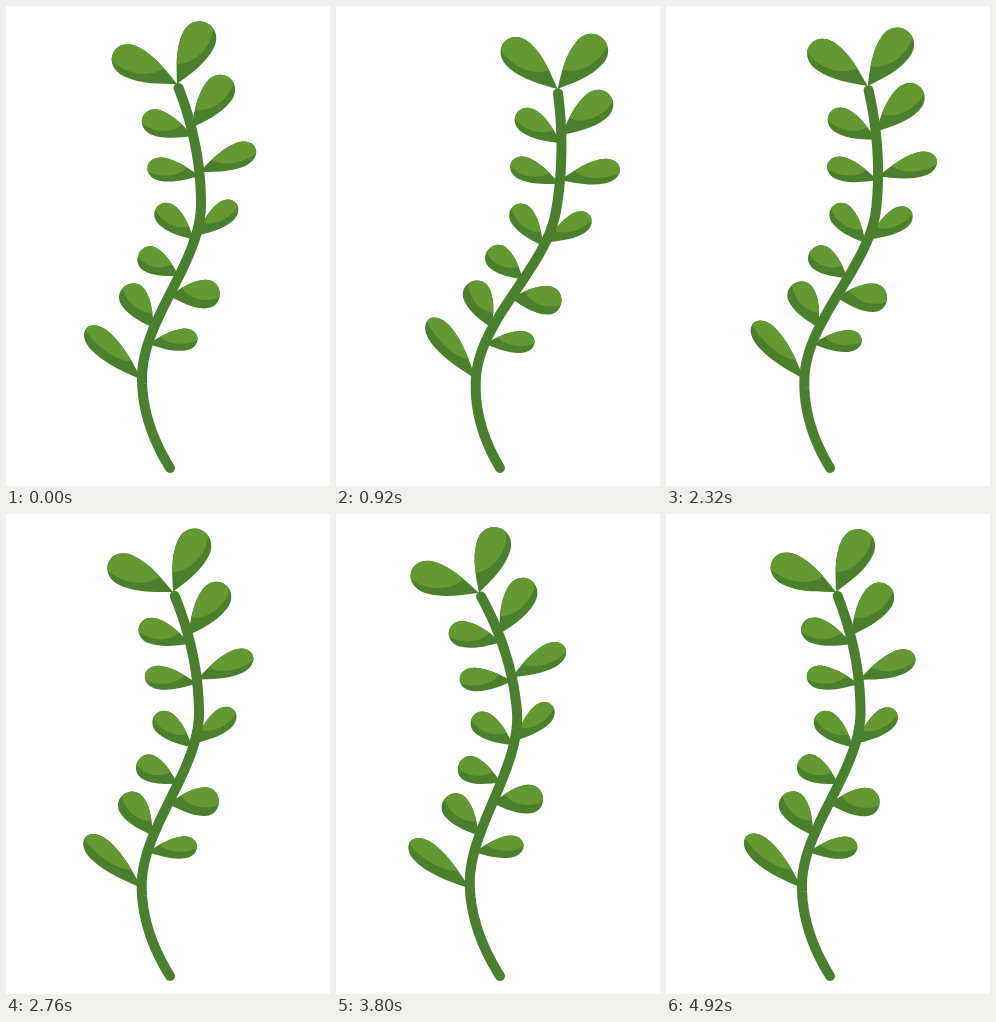
An HTML page with a canvas for the animation above (4960 ms loop, 324 by 480 pixels).

```html
<!DOCTYPE html>
<html lang="en">
<head>
<meta charset="utf-8">
<title>Swaying sprig</title>
<style>
  html, body { margin: 0; height: 100%; overflow: hidden; background: #fff; }
  canvas { display: block; }
</style>
</head>
<body>
<canvas width="324" height="480"></canvas>
<script>
const ctx = document.querySelector('canvas').getContext('2d');
const LOOP = 4960, STEP = 40, RAD = Math.PI / 180;
const DARK = '#4a802d', LIGHT = '#639833';
const ROOT_Y = 462, TOP_Y = 78, PARTS = 96;

// Height on the stem, angle from upright, length, half width.
const leaves = [
  [373, -47, 76, 12.7],
  [339, 83, 50, 11],
  [324, -34, 51, 14],
  [290, 87, 51, 14.3],
  [269, -60, 46, 13],
  [233, -48, 50, 12.3],
  [229, 51, 52, 11.5],
  [170, -80, 53, 11.7],
  [168, 67, 61, 12.3],
  [129, -70, 54, 13],
  [123, 37, 63, 15.5],
  [79, -64, 71, 16.3],
  [78, 26, 68, 17.3]
];

// Straight run out to the right, across to the left, and home.
function swayAt(time) {
  const right = 1595, left = 3240, far = 1.03, near = -0.49;
  if (time < right) return far * time / right;
  if (time < left) return far + (near - far) * (time - right) / (left - right);
  return near * (LOOP - time) / (LOOP - left);
}

// Resting stem: a hook at the root, an S in the middle, a hook at the top.
function restX(y) {
  if (y > 372) return 136 + 28 * ((y - 372) / 90) ** 2;
  if (y < 198) return 195 - 24 * ((198 - y) / 120) ** 2;
  const t = (372 - y) / 174;
  return 136 + 59 * t * t * (3 - 2 * t);
}

// Each piece of stem turns further the higher it sits.
function bendStem(sway) {
  const dy = (TOP_Y - ROOT_Y) / PARTS;
  let x = restX(ROOT_Y), y = ROOT_Y;
  const points = [[x, y]];
  for (let i = 0; i < PARTS; i++) {
    const rest = ROOT_Y + i * dy, dx = restX(rest + dy) - restX(rest);
    const bend = sway * (1.7 + 22 * (i + 0.5) / PARTS) * RAD;
    x += dx * Math.cos(bend) - dy * Math.sin(bend);
    y += dx * Math.sin(bend) + dy * Math.cos(bend);
    points.push([x, y]);
  }
  return points;
}

function drawLeaf([y, angle, length, half], points, sway) {
  const u = (ROOT_Y - y) / (ROOT_Y - TOP_Y);
  const side = Math.sign(angle);
  const turn = side > 0 ? 28 * u - 2 : 15 * u + 11;
  const shade = 0.35 * (1 - u);
  ctx.save();
  ctx.translate(...points[Math.round(u * PARTS)]);
  ctx.rotate((angle + turn * sway) * RAD);
  ctx.scale(side * half, -length);

  ctx.beginPath();
  ctx.moveTo(0, 0);
  ctx.bezierCurveTo(0.4, 0.2, 1, 0.45, 1, 0.72);
  ctx.bezierCurveTo(1, 0.89, 0.55, 1, 0, 1);
  ctx.bezierCurveTo(-0.55, 1, -1, 0.89, -1, 0.72);
  ctx.bezierCurveTo(-1, 0.45, -0.4, 0.2, 0, 0);
  ctx.fillStyle = DARK;
  ctx.fill();
  ctx.clip();

  ctx.beginPath();
  ctx.moveTo(0.4 - shade, 1.02);
  ctx.bezierCurveTo(0.85 - shade, 0.78, 0.6 - shade, 0.4, -0.6, 0.25);
  ctx.lineTo(-2, 0.25);
  ctx.lineTo(-2, 1.02);
  ctx.fillStyle = LIGHT;
  ctx.fill();
  ctx.restore();
}

function draw(now) {
  const sway = swayAt(Math.floor(now % LOOP / STEP) * STEP);
  const points = bendStem(sway);
  ctx.fillStyle = '#fff';
  ctx.fillRect(0, 0, 324, 480);
  for (const leaf of leaves) drawLeaf(leaf, points, sway);
  ctx.beginPath();
  for (const point of points.slice(0, -1)) ctx.lineTo(...point);
  ctx.strokeStyle = DARK;
  ctx.lineWidth = 10;
  ctx.lineCap = ctx.lineJoin = 'round';
  ctx.stroke();
}

const start = performance.now();
function tick() {
  draw(performance.now() - start);
  requestAnimationFrame(tick);
}
tick();
</script>
</body>
</html>
```
